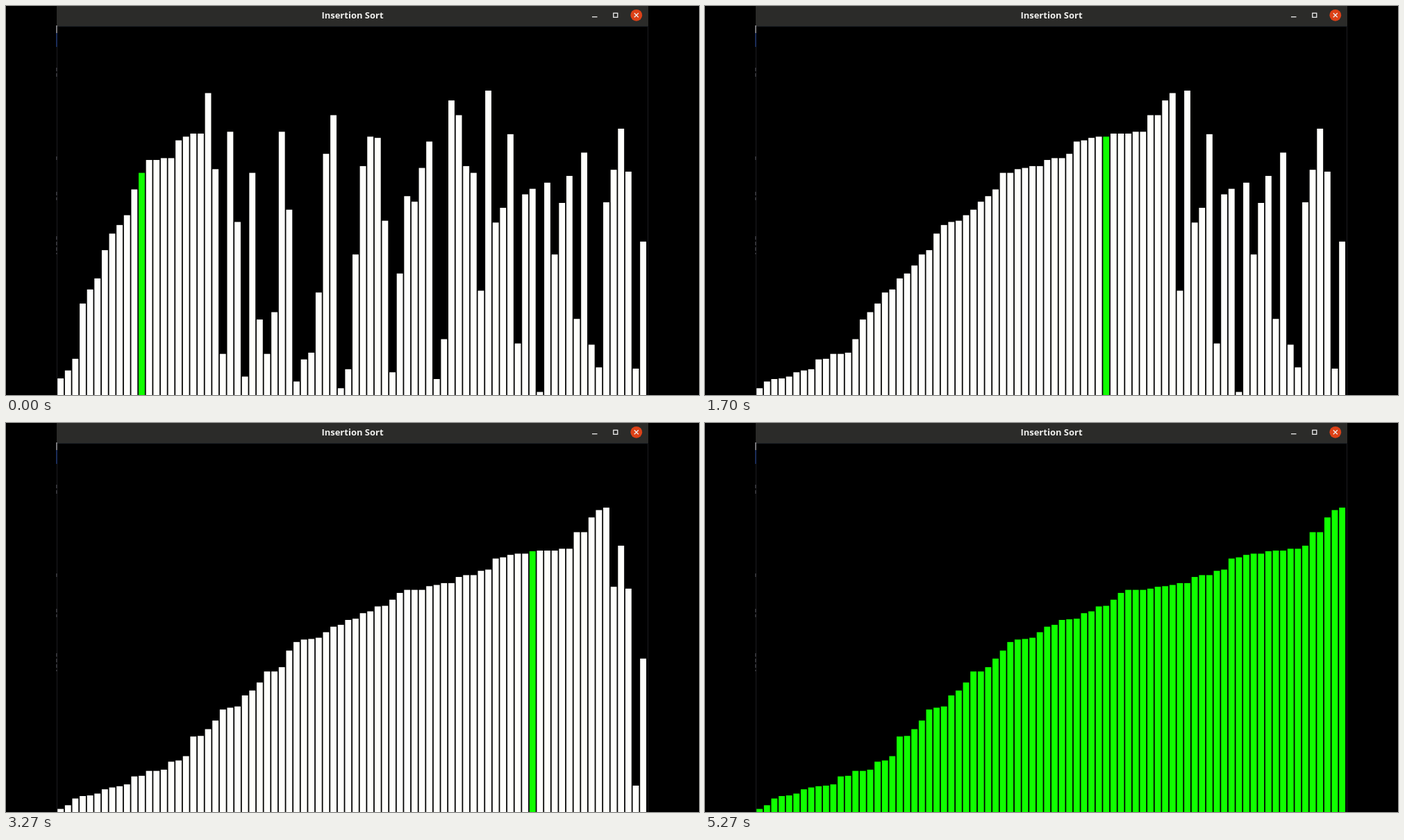
Write an HTML page with a canvas that moves like this. It is 998 px wide and 561 px high and loops after 5.56 s.

```html
<!DOCTYPE html>
<html lang="en">
<head>
<meta charset="utf-8">
<title>Insertion Sort</title>
<style>
  html, body { margin: 0; width: 100%; height: 100%; overflow: hidden; background: #000; }
  svg, canvas { position: absolute; left: 0; top: 0; display: block; }
  text { font: bold 13px "Open Sans", "Noto Sans", sans-serif; fill: #f0f0ee; text-anchor: middle; }
</style>
</head>
<body>
<svg width="998" height="561" viewBox="0 0 998 561">
  <rect width="998" height="561"/>
  <rect x="73" width="852" height="29" fill="#2b2b29"/>
  <path d="M73.5 29V561M924.5 29V561" stroke="#1c1c20"/>
  <path d="M73 29.5H925" stroke="#161a20"/>
  <path d="M73 28V39" stroke="#77777a" stroke-width="2"/>
  <path d="M73 39V59" stroke="#1b2d59" stroke-width="2"/>
  <path d="M73 89V102M73 217V222M73 268V280M73 332V358" stroke="#333338" stroke-width="2" stroke-dasharray="5 3"/>
  <text x="499" y="18.2">Insertion Sort</text>
  <g fill="none" stroke="#eee" stroke-width="1.3">
    <path d="M844 15.7h7.5"/>
    <rect x="874.8" y="10.3" width="6" height="6"/>
    <circle cx="907.8" cy="13.3" r="8.4" fill="#dc4117" stroke="none"/>
    <path d="M904.8 10.3l6 6m0 -6l-6 6"/>
  </g>
</svg>
<canvas id="bars" width="998" height="561"></canvas>
<script>
const LOOP = 5560, COUNT = 80, RANGE = 500;
const ctx = document.getElementById('bars').getContext('2d');

// Additive feedback generator, the same rule as C's rand() with seed 1.
function makeRandom(seed) {
  const r = [seed];
  while (r.length < 31) r.push(16807 * r[r.length - 1] % 2147483647);
  r.push(...r.slice(0, 3));
  const next = () => {
    const n = r.length;
    r.push((r[n - 3] + r[n - 31]) >>> 0);
    return r[n] >>> 1;
  };
  for (let k = 0; k < 310; k++) next();
  return next;
}

const random = makeRandom(1);
const bars = Array.from({ length: COUNT }, () => random() % RANGE);

// Each step stores the bars and the range [from, to] shown in green.
const steps = [];
const log = (from, to, i) => steps.push({ bars: bars.slice(), from, to, i });

for (let i = 1; i < COUNT; i++) {
  const key = bars[i];
  let j = i - 1;
  while (j >= 0 && bars[j] > key) {
    bars[j + 1] = bars[j];
    j--;
    log(j, j, i);
  }
  bars[j + 1] = key;
}
for (let k = 0; k < COUNT; k++) log(0, k, COUNT);

// Pace of the sort: [ms, step].
const at = (i, j) => steps.findIndex(s => s.i === i && s.from === j);
const pace = [
  [0, at(20, 11)], [570, at(33, 17)], [1200, at(46, 37)], [2200, at(64, 60)],
  [2830, at(70, 44)], [3670, at(79, 69)], [4000, steps.length - 1]
];

function stepAt(ms) {
  for (let n = 1; n < pace.length; n++) {
    const [t0, s0] = pace[n - 1], [t1, s1] = pace[n];
    if (ms < t1) return Math.round(s0 + (s1 - s0) * (ms - t0) / (t1 - t0));
  }
  return steps.length - 1;
}

// The picture refreshes 30 times a second, on whole hundredths.
function refreshTime(ms) {
  const tick = Math.floor((Math.floor(ms / 10) + 0.5) * 0.3);
  return Math.round(tick * 10 / 3) * 10;
}

// The bars live in a 960 x 600 window, shown at reduced size.
ctx.setTransform(0.885, 0, 0, 0.885, 74.2, 30);

let shown = -1;
function draw(now) {
  const n = stepAt(refreshTime(now % LOOP));
  if (n === shown) return;
  shown = n;
  const { bars, from, to } = steps[n];
  ctx.clearRect(0, 0, 960, 600);
  bars.forEach((height, i) => {
    ctx.fillStyle = i >= from && i <= to ? '#10ff00' : '#fffffc';
    ctx.fillRect(i * 12, 600 - height, 10, height);
  });
}

const start = performance.now();
function loop() {
  draw(performance.now() - start);
  requestAnimationFrame(loop);
}
loop();
</script>
</body>
</html>
```
